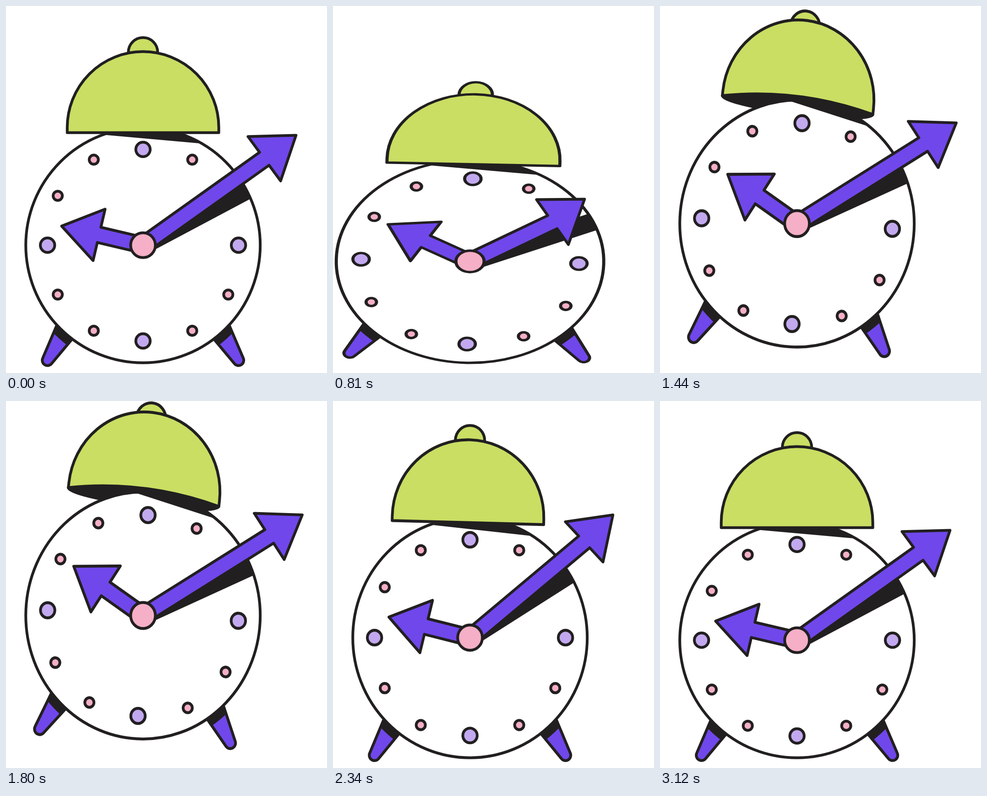
These frames come from a looping animation (701x799 px, 3300 ms). An HTML page with a canvas:

```html
<!DOCTYPE html>
<html lang="en">
<head>
<meta charset="utf-8">
<title>Jumping alarm clock</title>
<style>
html, body { margin: 0; width: 100%; height: 100%; overflow: hidden; background: #fff; }
canvas { display: block; width: 701px; height: 799px; }
</style>
</head>
<body>
<canvas id="stage" width="701" height="799"></canvas>
<script>
const ctx = document.getElementById('stage').getContext('2d');
const LOOP = 3300, STEP = 30, REST = 3120;
const CX = 299.2, FLOOR = 777.8, R = 256;
const INK = '#221f20', GREEN = '#c9de63', VIOLET = '#7047eb';
const LILAC = '#c2a9ef', PINK = '#f5afc6', WHITE = '#fff';

const rad = d => d * Math.PI / 180;
const part = (t, a, b) => Math.max(0, Math.min(1, (t - a) / (b - a)));
const ramp = (t, a, b) => { const u = part(t, a, b); return u * u * (3 - 2 * u); };
// rises over a..b, holds, falls over c..d
const hold = (t, a, b, c, d) => ramp(t, a, b) - ramp(t, c, d);
// damped swing that begins at the given time
function swing(t, start, period, decay) {
  const s = Math.max(0, t - start);
  return Math.exp(-decay * s) * Math.sin(2 * Math.PI * s / period);
}

function pose(t) {
  const rise = 1 - (1 - part(t, 880, 1850)) ** 2.1;
  const fall = part(t, 1850, 2050) ** 2;
  const sy = 1 + 0.05 * hold(t, 800, 960, 1990, 2080)
    - 0.158 * hold(t, 555, 770, 775, 930)
    - 0.272 * swing(t, 2035, 350, 0.0072);
  const squash = Math.max(0, 1 - sy);
  const tilt = hold(t, 815, 980, 1880, 2090);
  const rebound = -swing(t, 2020, 440, 0.0035);
  return {
    sx: 1 + 1.03 * squash,
    sy,
    cy: FLOOR - 41 * rise * (1 - fall) - 257 * sy,
    splay: 26 * squash,
    lean: 3 * hold(t, 640, 980, 1850, 2150),
    tilt,
    bellLean: 3.8 * tilt + 1.5 * hold(t, 2190, 2320, 2360, 2600),
    hour: 13.2 + 20.8 * hold(t, 0, 1080, 1850, 2400),
    minute: 35.4 - 360 * ramp(t, 0, 720) - 15 * hold(t, 700, 880, 880, 1060)
      - 3.4 * hold(t, 800, 1000, 2000, 2150) + 13.9 * rebound,
    shaft: 325 - 141.5 * hold(t, 0, 230, 785, 905) + 22 * hold(t, 860, 960, 960, 1200),
    bend: 1 + 9 * hold(t, 0, 220, 810, 920) + 7 * rebound
  };
}

function paint(fill) {
  ctx.fillStyle = fill;
  ctx.fill();
  ctx.stroke();
}

function circle(x, y, r, fill) {
  ctx.beginPath();
  ctx.arc(x, y, r, 0, 2 * Math.PI);
  paint(fill);
}

function within(draw) {
  ctx.save();
  draw();
  ctx.restore();
}

function leg(side, p) {
  within(() => {
    ctx.scale(side, 1);
    ctx.rotate(rad(p.splay + side * p.tilt));
    ctx.beginPath();
    ctx.moveTo(-180, 155);
    ctx.lineTo(-189, 176);
    ctx.arc(-208.5, 250.5, 11.5, 3.6, 0.65, true);
    ctx.lineTo(-157, 207);
    ctx.lineTo(-140, 187);
    ctx.closePath();
    paint(VIOLET);
    ctx.clip();
    ctx.beginPath();
    ctx.arc(0, 0, 273.5, 0, 2 * Math.PI);
    ctx.fillStyle = INK;
    ctx.fill();
  });
}

function turnBell(angle) {
  ctx.translate(0, -420);
  ctx.rotate(rad(angle));
  ctx.translate(0, 420);
}

function bellUnderside(tilt) {
  ctx.beginPath();
  ctx.ellipse(0, -245, 165.5, 18 * tilt, 0, 0, 2 * Math.PI);
  paint(INK);
}

function bell(tilt) {
  circle(-3 * tilt, -420 + 11 * tilt, 32, GREEN);
  ctx.beginPath();
  ctx.moveTo(-165.5, -245);
  ctx.lineTo(-165.5, -256);
  ctx.arc(0, -256, 165.5, Math.PI, 0);
  ctx.lineTo(165.5, -245);
  ctx.quadraticCurveTo(0, -245 - 36 * tilt, -165.5, -245);
  ctx.closePath();
  paint(GREEN);
}

function face(p) {
  circle(0, 0, R, WHITE);
  // shade cast by the bell
  ctx.beginPath();
  ctx.arc(0, 0, R, rad(-110 + 12.7 * p.tilt), rad(-59.8 + 1.37 * p.bellLean));
  ctx.closePath();
  ctx.fillStyle = INK;
  ctx.fill();
  for (let i = 0; i < 12; i++) {
    const big = i % 3 === 0, d = big ? 208.5 : 215, a = rad(i * 30);
    circle(d * Math.cos(a), d * Math.sin(a), big ? 15.7 : 10, big ? LILAC : PINK);
  }
}

function hand(len, bend, half, wide, tip) {
  ctx.beginPath();
  ctx.moveTo(0, half);
  ctx.lineTo(0, -half);
  within(() => {
    ctx.translate(len, 0);
    ctx.rotate(rad(-bend));
    ctx.lineTo(0, -half);
    ctx.lineTo(0, -wide);
    ctx.lineTo(tip, 0);
    ctx.lineTo(0, wide);
    ctx.lineTo(0, half);
  });
  ctx.closePath();
  paint(VIOLET);
}

function draw(t) {
  const p = pose(t);
  ctx.setTransform(1, 0, 0, 1, 0, 0);
  ctx.fillStyle = WHITE;
  ctx.fillRect(0, 0, 701, 799);
  ctx.strokeStyle = INK;
  ctx.lineWidth = 6;
  ctx.lineJoin = 'round';
  ctx.translate(CX, p.cy);

  within(() => {
    ctx.scale(p.sx, p.sy);
    ctx.rotate(rad(p.lean));
    leg(1, p);
    leg(-1, p);
    if (p.tilt > 0) within(() => { turnBell(p.bellLean); bellUnderside(p.tilt); });
    face(p);
    within(() => { turnBell(p.bellLean); bell(p.tilt); });
  });

  // shade cast by the long hand, kept inside the face
  within(() => {
    ctx.beginPath();
    ctx.ellipse(0, 0, R * p.sx, R * p.sy, 0, 0, 2 * Math.PI);
    ctx.clip();
    ctx.rotate(rad(7.5 - p.minute));
    ctx.fillStyle = INK;
    ctx.fillRect(0, -19, 320, 39.5);
  });

  within(() => {
    ctx.scale(p.sx, p.sy);
    ctx.rotate(rad(180 + p.hour));
    hand(98.5, 0, 17, 57.5, 84);
  });
  within(() => {
    ctx.rotate(rad(-p.minute));
    hand(p.shaft, p.bend, 17.5, 60, 86);
  });
  within(() => {
    ctx.scale(p.sx, p.sy);
    circle(0, 0, 27, PINK);
  });
}

function tick() {
  const t = performance.now() % LOOP;
  draw(Math.min(REST, Math.floor(t / STEP) * STEP));
  requestAnimationFrame(tick);
}
tick();
</script>
</body>
</html>
```
